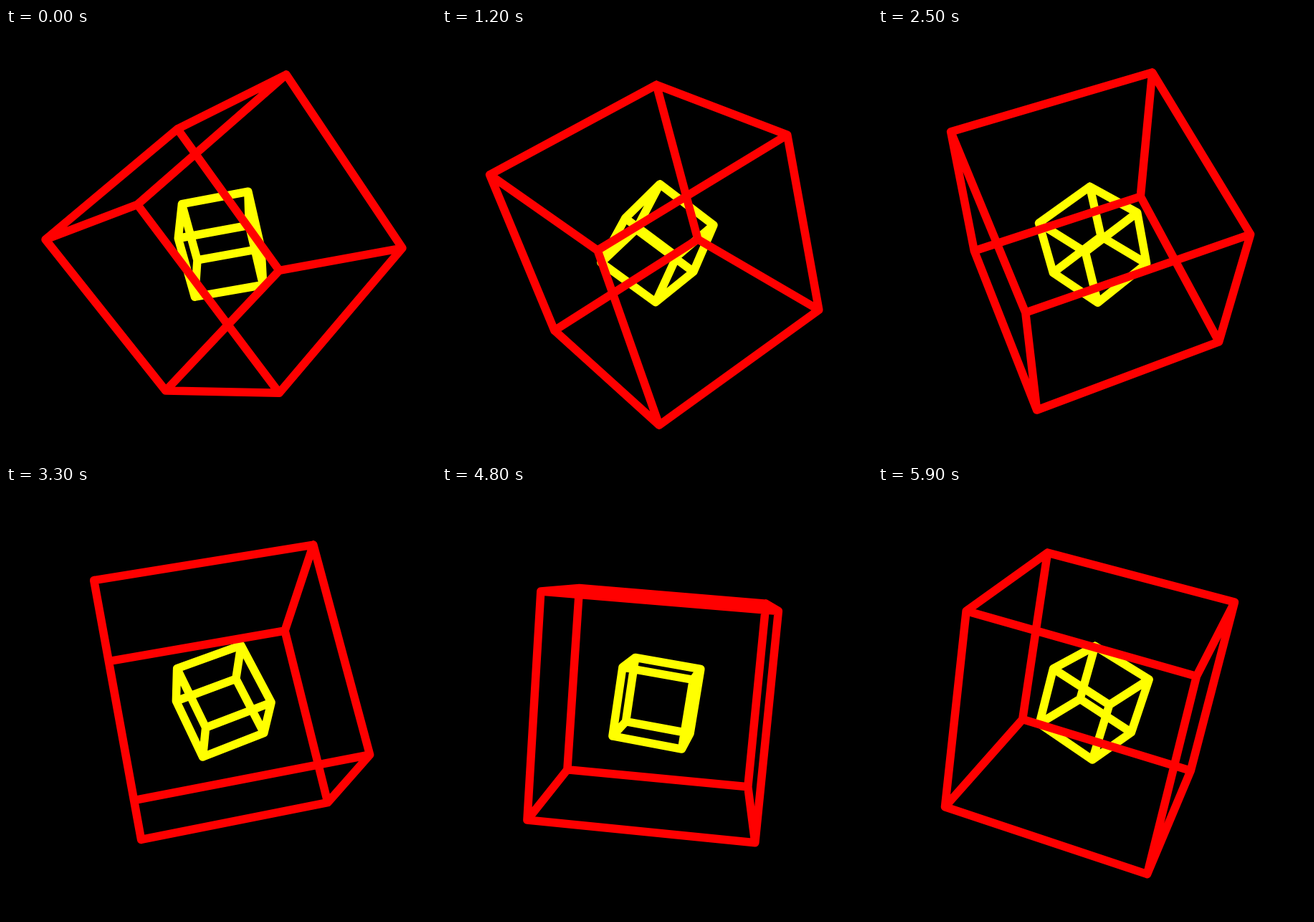
Animation, 600 px wide and 600 px high, one loop 6 s. Source, as an HTML page with a canvas:

```html
<!DOCTYPE html>
<html lang="en">
<head>
<meta charset="utf-8">
<title>Two rotating cubes</title>
<style>
  html, body { margin: 0; width: 100%; height: 100%; overflow: hidden; background: #000; }
  canvas { display: block; width: 600px; height: 600px; }
</style>
</head>
<body>
<canvas id="stage" width="600" height="600"></canvas>
<script>
const ctx = document.getElementById('stage').getContext('2d');
const STEP_MS = 100, STEPS = 60;
const CENTER = 301, DEPTH = 1200;

// half: half of the side; spin: factors for the x, y and z angles
const cubes = [
  { color: '#ff0', half: 48, spin: [1.4, 0.8, -1.2] },
  { color: '#f00', half: 144, spin: [1, 0.4, -0.6] }
];

const corners = [...Array(8).keys()].map(i => [0, 1, 2].map(b => (i >> b & 1) * 2 - 1));
const edges = [];
for (let i = 0; i < 8; i++)
  for (const bit of [1, 2, 4])
    if (!(i & bit)) edges.push([i, i | bit]);

const turn = (a, b, angle) => {
  const c = Math.cos(angle), s = Math.sin(angle);
  return [a * c - b * s, a * s + b * c];
};

function project(corner, half, [ax, ay, az]) {
  let [x, y, z] = corner.map(v => v * half);
  [y, z] = turn(y, z, ax);
  [z, x] = turn(z, x, ay);
  [x, y] = turn(x, y, az);
  const scale = DEPTH / (DEPTH - z);
  return [CENTER + x * scale, CENTER + y * scale];
}

function drawCube({ color, half, spin }, angle) {
  const angles = spin.map(k => k * angle);
  const points = corners.map(c => project(c, half, angles));
  ctx.strokeStyle = color;
  ctx.beginPath();
  for (const [a, b] of edges) {
    ctx.moveTo(...points[a]);
    ctx.lineTo(...points[b]);
  }
  ctx.stroke();
}

function draw(step) {
  ctx.fillStyle = '#000';
  ctx.fillRect(0, 0, 600, 600);
  ctx.lineWidth = 11.5;
  ctx.lineCap = 'round';
  const angle = 0.03 * (43 - step);
  for (const cube of cubes) drawCube(cube, angle);
}

const start = performance.now();
function tick() {
  draw(Math.floor((performance.now() - start) / STEP_MS) % STEPS);
  requestAnimationFrame(tick);
}
tick();
</script>
</body>
</html>
```
